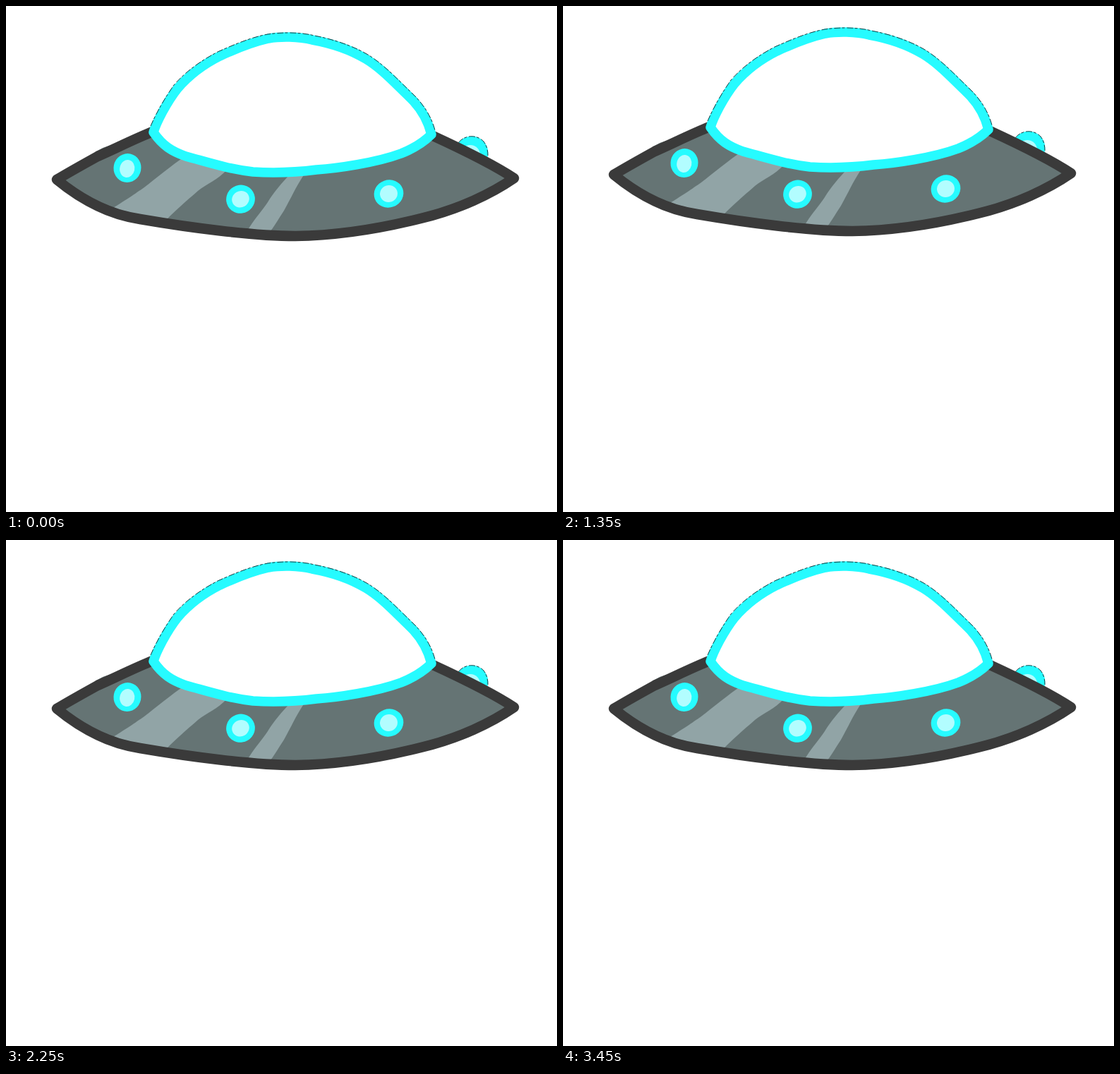
Write an HTML page that moves like this. It is 781x717 px and loops after 3600 ms.

```html
<!DOCTYPE html>
<html lang="en">
<head>
<meta charset="utf-8">
<title>Hovering saucer</title>
<style>
  html, body { margin: 0; width: 100%; height: 100%; overflow: hidden; background: #fff; }
  svg { display: block; }
  .ship { animation: hover 600ms step-end infinite; }
  .hull { fill: #657474; }
  .rim { fill: none; stroke: #3a3a3a; stroke-width: 14.5; stroke-linejoin: round; }
  .shine { fill: #91a4a6; }
  .dome { fill: #fff; stroke: #26fbff; stroke-width: 13.5; stroke-linejoin: round; }
  .lamp { fill: #26fbff; }
  .glow { fill: #b2fdff; }
  .fringe { fill: none; stroke: #173c40; stroke-width: 1; stroke-dasharray: 9 2 4 3; }

  @keyframes hover {
    0% { transform: translateY(0); }
    25%, 75% { transform: translateY(-7px); }
    50% { transform: translateY(-14px); }
  }
</style>
</head>
<body>
<svg width="781" height="717" viewBox="0 0 781 717">
  <defs>
    <path id="hull" d="M72 246 C92 234 112 223 130 213 C155 202 185 187 208 178 L603 183
      C640 200 690 224 720 244 C688 266 642 288 590 300.500 C525 317 460 325.500 410 326
      C350 326 260 314 190 302 C150 296 112 279 72 246 Z"/>
  </defs>
  <g class="ship">
    <!-- far side lamp -->
    <circle class="lamp" cx="660" cy="208" r="23.5"/>
    <circle class="glow" cx="658" cy="211" r="14"/>
    <path class="fringe" d="M641 194 C650 182 668 182 677 192 Q683 200 683 212"/>
    <path class="hull" d="M122 211 Q134 199 156 196 Z"/>

    <use href="#hull" class="hull"/>
    <path class="shine" d="M144 291 C170 275 183 266 196 257 C213 244 233 227 255 212 L314 231
      C300 247 284 252 272 262 C256 276 244 286 223 307 Z"/>
    <path class="shine" d="M340 322 C352 301 361 293 371 278 C380 263 390 252 403 238 L423 238
      C411 256 404 272 394 290 C386 302 380 313 372 323 Z"/>
    <use href="#hull" class="rim"/>

    <path class="dome" d="M209 179 C213 165 228 136 243 117 C262 95 285 80 303 71
      C329 59 350 51 372 46 C388 43 415 43 434 48 C462 53 490 63 510 75
      C532 88 552 110 571 128 C588 144 598 162 603 182 C590 195 575 203 560 209
      C525 222 470 230 440 232 C405 236.500 375 236.500 350 235 C315 231 285 221 255 213
      C235 206 222 198 209 179 Z"/>
    <path class="fringe" d="M205 170 C212 154 222 135 238 112 C257 90 281 75 300 65
      C327 53 349 44 371 40 C392 37 418 37 437 42 C464 47 493 57 513 69
      C536 83 556 105 575 123 C592 139 603 157 608 176"/>

    <g transform="translate(172 229.500) rotate(12)">
      <ellipse class="lamp" rx="19.5" ry="20.5"/>
      <ellipse class="glow" cy="1" rx="10.5" ry="12.5"/>
    </g>
    <g transform="translate(332.500 273.700) rotate(-30)">
      <ellipse class="lamp" rx="20.5" ry="20"/>
      <ellipse class="glow" rx="12.5" ry="11.5"/>
    </g>
    <g transform="translate(542.500 266) rotate(-20)">
      <ellipse class="lamp" rx="21" ry="19.5"/>
      <ellipse class="glow" rx="12.5" ry="12"/>
    </g>
  </g>
</svg>
</body>
</html>
```
